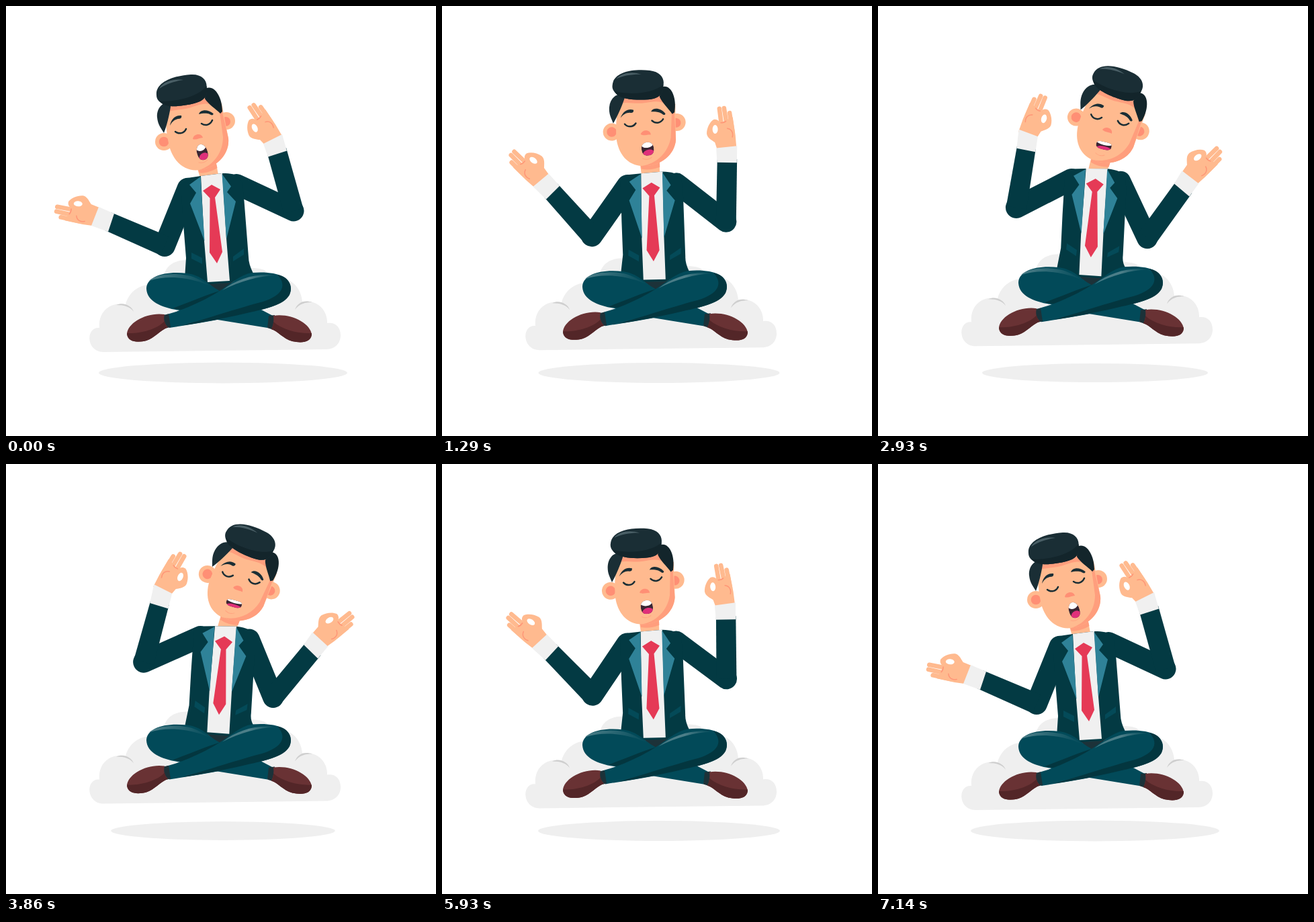
Animation, 640 px wide and 640 px high, one loop 7.21 s. Source, as an HTML page:

```html
<!DOCTYPE html>
<html lang="en">
<head>
<meta charset="utf-8">
<title>Floating meditation</title>
<style>
  html, body { margin: 0; width: 100%; height: 100%; overflow: hidden; background: #fff; }
  svg { display: block; width: 100vw; height: 100vh; }
  .jacket { fill: #033a43; }
  .sleeve { stroke: #033a43; stroke-width: 32; stroke-linecap: round; }
  .lapel { fill: #2f8298; }
  .pocket { fill: #044a58; }
  .shirt { fill: #f0f0f0; }
  .tie { fill: #e53a56; }
  .pants { fill: #024a59; }
  .shade { fill: #03363f; }
  .sock { fill: #1c3239; }
  .shoe { fill: #693234; }
  .sole { fill: #532628; }
  .skin { fill: #ffba8f; }
  .blush { fill: #ff9e7d; }
  .ear { fill: #ff8f75; }
  .hair { fill: #1a2e35; }
  .hair-dark { fill: #13252b; }
  .gloss { fill: #4a5f66; }
  .cloud { fill: #efefef; }
  .fold { fill: #cfcfcf; }
  .finger { stroke: #ffba8f; stroke-width: 6.6; stroke-linecap: round; fill: none; }
  .crease { stroke: #ff9677; stroke-width: 1.5; stroke-linecap: round; fill: none; }
  .lash { stroke: #1a2e35; stroke-width: 2.5; stroke-linecap: round; fill: none; }
</style>
</head>
<body>
<svg viewBox="0 0 640 640">
  <defs>
    <linearGradient id="glossL"><stop offset="0" stop-color="#4d7f89"/><stop offset="1" stop-color="#4d7f89" stop-opacity="0"/></linearGradient>
    <linearGradient id="glossR"><stop offset="0" stop-color="#4d7f89" stop-opacity=".9"/><stop offset=".5" stop-color="#4d7f89"/><stop offset="1" stop-color="#4d7f89" stop-opacity="0"/></linearGradient>
    <clipPath id="lips"><path id="lipLine"/></clipPath>
    <g id="hand">
      <path class="finger" d="M-13.6 -49L-12.8 -22M-6.8 -57.5L-6 -25M.2 -58L2 -25"/>
      <path class="skin" d="M-17 -42L-16 -15L-14 5H14L16 -10C21 -15 26 -19 25.5 -25C24 -33 18 -41 12 -43.500C7 -44 4 -41 3 -36L-2 -38Z"/>
      <ellipse cx="12" cy="-29" rx="4" ry="6.500" fill="#fff" transform="rotate(-10 12 -29)"/>
      <path class="crease" d="M-11 -13C-14 -19 -12 -25 -6 -27M-6 -38Q-3 -36 2 -37"/>
    </g>
  </defs>

  <ellipse id="shadow" class="cloud" rx="185" ry="15.400"/>

  <g id="float">
    <path class="cloud" d="M145 515C119 515 118 477 139 479C137 456 153 440 178 444C182 428 196 415 214 415L236 398C240 384 254 378 270 378L365 390C378 390 387 392 391 399L424 410C434 416 440 428 441 440C462 436 479 452 478 472C490 470 498 478 498 490C498 502 490 511 476 511Z"/>
    <path class="fold" d="M164 445C175 440 187 446 190 455C185 448 177 445 164 445ZM430 452C434 441 444 437 456 441C445 441 437 443 430 452Z"/>
    <path class="sock" d="M284 399H352L318 427Z"/>

    <g id="torso">
      <g id="upperL">
        <path class="sleeve" d="M270.500 271.700L236 357"/>
        <g id="foreL">
          <g id="handL"><use href="#hand"/></g>
          <path class="jacket" d="M157 307.500L147.500 334L230 371L242 343Z"/>
          <polygon id="cuffL" class="shirt"/>
        </g>
      </g>
      <g id="upperR">
        <path class="sleeve" d="M343.300 265.500L428 305" style="stroke-width:31"/>
        <g id="foreR">
          <g id="handR"><use href="#hand" transform="scale(-1 1)"/></g>
          <path class="jacket" d="M389 220L417 211L442.400 301L413.600 309Z"/>
          <polygon id="cuffR" class="shirt"/>
        </g>
      </g>

      <g id="head">
        <path class="skin" d="M283 236L312 230L317 256L291 262Z"/>
        <path class="blush" d="M283 236L312 230L314.500 241C306 246 297 249 288 248.500Z"/>
        <circle class="skin" cx="235" cy="202" r="13"/>
        <circle class="skin" cx="328" cy="171" r="13"/>
        <circle class="ear" cx="235" cy="202" r="7.300"/>
        <circle class="ear" cx="327" cy="172" r="7"/>
        <path class="skin" d="M240 152C236 172 239 190 243 209C250 233 267 247 288 244C316 240 333 219 331 197L321 145L298 125L244 138Z"/>
        <path class="blush" d="M320 150L331 197C333 219 316 240 288 244C309 237 323 218 323 195L318 158Z"/>
        <path class="blush" d="M243 145L299 130L308 148C297 142 285 148 272 152C260 155 250 154 243 157Z"/>
        <path class="hair" d="M245 144C232 142 224 153 225 166C226 177 231 182 235 189C239 179 243 163 245 150Z"/>
        <path class="hair-dark" d="M297 123C309 116 322 134 322 157L319 160C312 153 301 146 296 138Z"/>
        <path class="hair" d="M224 133C222 114 248 104 275 102C292 101 300 111 298.500 122C301 133 296 141 280 145C264 149 241 152 232 145C227 142 224 138 224 133Z"/>
        <path class="hair-dark" d="M228 141C245 144 285 137 298.500 119C301 133 296 141 280 145C264 149 241 152 232 145Z"/>
        <path class="gloss" d="M228 123C234 112 250 108 264 110C250 112 238 116 228 123Z"/>
        <path id="brows" class="hair" d="M244 178C246 167 253 162 261 163C262 167 260 168 256 168C251 169 247 172 244 178ZM287 161C289 154 300 153 308.500 160C309 163 306 163 303 161C298 159 292 160 287 161Z"/>
        <path class="lash" d="M252 187C257 191 265 190 268 183M291 175C297 179 304 177 307 170"/>
        <path class="ear" d="M278 198C279 190 291 188 293 196C288 196 283 200 278 198Z"/>
        <path class="crease" d="M287 233Q295 235 300 229" style="stroke-width:1;opacity:.6"/>
        <g id="mouth">
          <g clip-path="url(#lips)">
            <rect x="-10" y="-14" width="20" height="28" fill="#3a2633"/>
            <ellipse cy="-10" rx="8.500" ry="8" fill="#fff"/>
            <ellipse cx="1" cy="9.500" rx="8" ry="8" fill="#e0307a"/>
          </g>
        </g>
      </g>

      <path id="jacket" class="jacket"/>
      <path class="shirt" d="M290 253L322 249L328 346L333 409L300 411L295 350Z"/>
      <path class="lapel" d="M289.500 254L273 266L283 278L274 294L295.500 350ZM321.500 250L335 268.500L329 277L342 291L328 347Z"/>
      <path class="tie" d="M306 266L319 273L311 285L322 366L314 383L303 367L303.500 286L293 275Z"/>
      <path class="pocket" d="M276 367L292 375V384L276 376ZM338 373L354 361V370L338 380Z"/>
    </g>

    <path class="pants" d="M270 398C235 394 209 403 209 421C210 440 232 449 258 453L312 466.500L389 479L397 461L378 451L318 424C300 414 292 401 270 398Z"/>
    <path d="M213 409C224 398 255 397 275 402C287 406 296 411 306 418C285 407 245 398 213 409Z" fill="url(#glossL)"/>
    <path class="shade" d="M248 450C275 440 298 430 318 424L330 428L264 453Z"/>
    <path class="pants" d="M366 397C402 394 424 403 424 420C424 438 402 447 376 453C345 462 300 470 243 479L239 459C264 453 300 436 318 424C336 413 348 400 366 397Z"/>
    <path class="shade" d="M404 400C423 403 427 420 422 430C413 446 385 451 350 459C328 464 295 471 262 475.500C300 465 345 450 375 442C408 434 421 418 404 400Z"/>
    <path d="M322 423C345 405 375 397 401 401C375 402 350 409 322 423Z" fill="url(#glossR)"/>
    <path class="sock" d="M233 460L242 458.500L245 478L236 480ZM391 461L400 460L398 482L389 479Z"/>
    <path class="shoe" d="M236 459C211 455 180 471 180 489C182 501 197 501 209 498C221 494 229 483 241 478C236 473 234 467 236 459Z"/>
    <path class="sole" d="M180 487C198 488 224 482 236 469C237 473 238 476 241 478C229 483 221 494 209 498C197 501 181 501 180 487Z"/>
    <path class="shoe" d="M398 461C424 457 453 472 455 489C454 501 440 502 426 499C412 495 405 484 395 481C398 475 399 468 398 461Z"/>
    <path class="sole" d="M398 470C411 482 436 488 455 487C455 501 440 502 426 499C412 495 405 484 395 481C397 477 398 474 398 470Z"/>
  </g>
</svg>
<script>
  const LOOP = 7210, STEP = 1000 / 14, HALF = 50;
  const $ = id => document.getElementById(id);
  const set = (id, value, name = 'transform') => $(id).setAttribute(name, value);

  // Joints that turn by `turn` degrees, relative to their parent, over one sway.
  const joints = {
    torso: { turn: 8, at: [317, 405] },
    head: { turn: 25.5, at: [306, 265] },
    upperL: { turn: 36.7, at: [270.5, 271.7] },
    foreL: { turn: 38.5, at: [236, 357] },
    upperR: { turn: 35.5, at: [343.3, 265.5] },
    foreR: { turn: 12.7, at: [428, 305] }
  };
  // Each cuff runs from the wrist to the sleeve hem; `edge` and `hemEdge` are half widths.
  const wrists = {
    L: { at: [132.5, 313], edge: [5.5, -14], hem: [156.5, 322.5], hemEdge: [4.5, -13.5], start: -76, turn: 27.5 },
    R: { at: [397, 198], edge: [-14, 7], hem: [404, 220], hemEdge: [-14, 4.5], start: -36, turn: 29.8 }
  };

  function rotate([x, y], degrees, [cx, cy] = [0, 0]) {
    const a = degrees * Math.PI / 180, c = Math.cos(a), s = Math.sin(a);
    const dx = x - cx, dy = y - cy;
    return [cx + dx * c - dy * s, cy + dx * s + dy * c];
  }

  function edgeEnds([x, y], half, degrees) {
    const [dx, dy] = rotate(half, degrees);
    return [[x + dx, y + dy], [x - dx, y - dy]];
  }

  function cuffPoints({ at, edge, hem, hemEdge }, p) {
    const [a, b] = edgeEnds(at, edge, 14 * p);
    const [c, d] = edgeEnds(hem, hemEdge, 7 * p);
    return [a, c, d, b].join(' ');
  }

  // The jacket leans with the torso while its hem corners stay on the lap.
  function jacketPath(p) {
    const { turn, at } = joints.torso;
    const left = rotate([266.5, 398], -turn * p, at), right = rotate([368, 398], -turn * p, at);
    return `M290 253L270 256L260 266L264 325L268 375L${left}L300 414L333 412L${right}` +
      'Q361 384 361 374L354 284L351 262C347 251 338 249 322 249Z';
  }

  function lipPath(p) {
    const side = -6 - 5 * p, top = 4 + 3 * p;
    return `M-8 0C-8 ${side} ${-top} -12 0 -12C${top} -12 8 ${side} 8 0C8 8 5 12 0 12C-5 12 -8 8 -8 0Z`;
  }

  function pose(p) {
    set('shadow', `translate(323 546) scale(${1 - 0.1 * p})`);
    set('float', `translate(0 ${-9.6 * p})`);
    for (const [id, { turn, at }] of Object.entries(joints)) set(id, `rotate(${turn * p} ${at})`);
    for (const [side, wrist] of Object.entries(wrists)) {
      set('hand' + side, `translate(${wrist.at}) rotate(${wrist.start + wrist.turn * p})`);
      set('cuff' + side, cuffPoints(wrist, p), 'points');
    }
    set('jacket', jacketPath(p), 'd');
    set('lipLine', lipPath(p), 'd');
    set('brows', `translate(${p} ${3.5 * p})`);
    set('mouth', `translate(292 217.500) rotate(-17) scale(${1 + 0.5 * p} ${1 - 0.57 * p})`);
  }

  const ease = u => u * u * (3 - 2 * u);

  function draw() {
    const step = Math.floor((performance.now() % LOOP + 5) / STEP);
    const u = Math.max(0, 1 - Math.abs(step - HALF) / HALF);
    pose(ease(u));
    requestAnimationFrame(draw);
  }
  draw();
</script>
</body>
</html>
```
